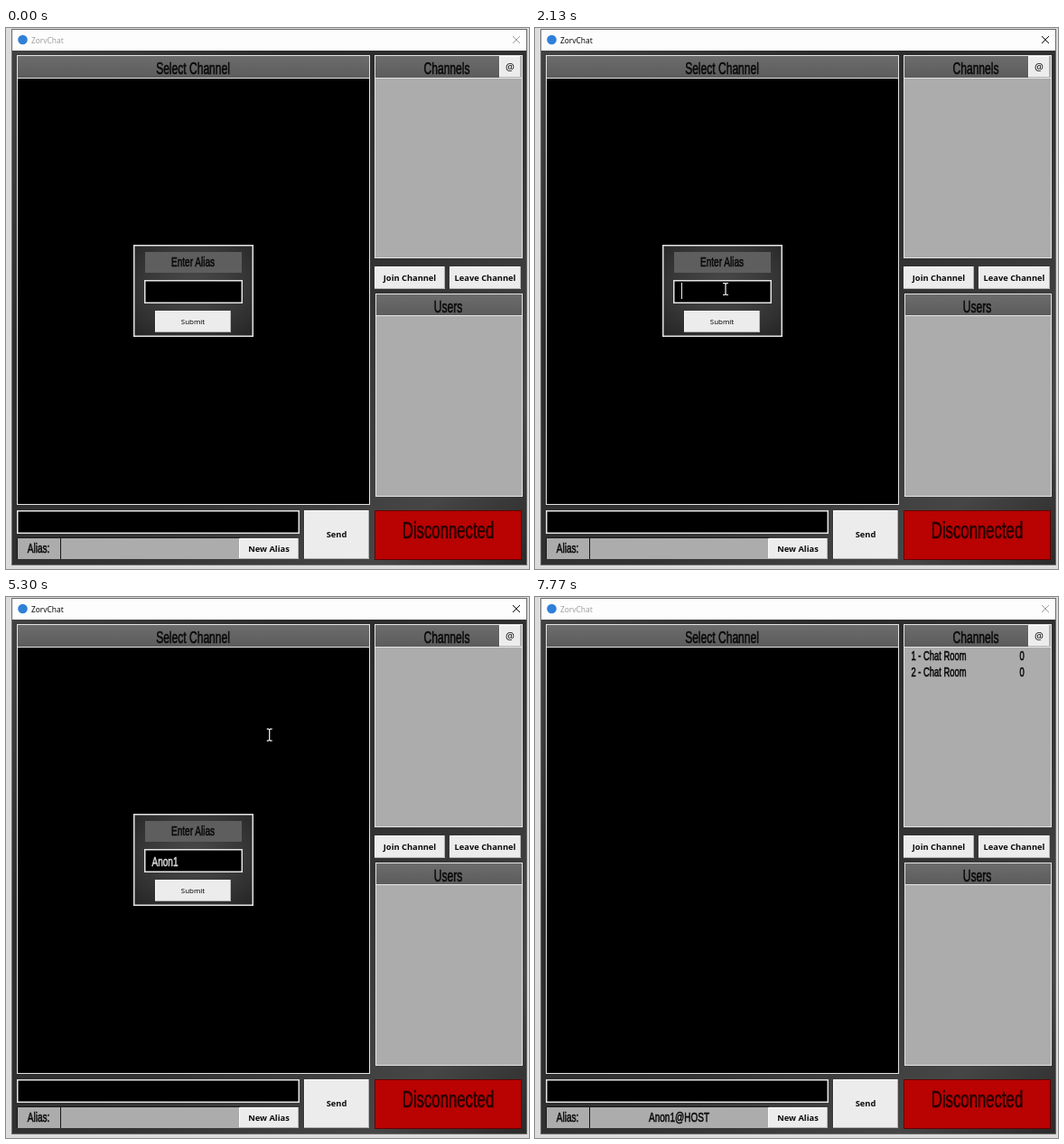
An HTML page that plays this animation: 579 by 599 pixels, repeating every 8000 ms.

```html
<!DOCTYPE html>
<html lang="en">
<head>
<meta charset="utf-8">
<title>ZorvChat</title>
<style>
html, body { margin: 0; width: 100%; height: 100%; overflow: hidden; background: #dcdcdc; }
svg { display: block; width: 100vw; height: 100vh; }
text { white-space: pre; }
.narrow { font-family: "Liberation Sans", Arial, sans-serif; }
.ui { font-family: "Noto Sans", "Open Sans", sans-serif; text-anchor: middle; }
</style>
</head>
<body>
<svg id="stage" viewBox="0 0 579 599">
  <defs>
    <linearGradient id="shade" x1="0" y1="0" x2="1" y2="1">
      <stop offset="0" stop-color="#444"/>
      <stop offset=".3" stop-color="#2b2b2b"/>
      <stop offset=".6" stop-color="#333"/>
      <stop offset=".85" stop-color="#464646"/>
      <stop offset="1" stop-color="#2a2a2a"/>
    </linearGradient>
    <radialGradient id="glow" cx=".5" cy=".45" r=".75">
      <stop offset="0" stop-color="#4a4a4a"/>
      <stop offset=".55" stop-color="#383838"/>
      <stop offset="1" stop-color="#242424"/>
    </radialGradient>
    <linearGradient id="head" x1="0" y1="0" x2="0" y2="1">
      <stop offset="0" stop-color="#6c6c6c"/>
      <stop offset="1" stop-color="#5c5c5c"/>
    </linearGradient>
  </defs>
</svg>
<script>
const LOOP = 8000;
const NARROW = 0.67;
const PALE = '#ececec', EDGE = '#e4e4e4', GREY = '#acacac', INK = '#0a0a0a';
const ALIAS = 'Anon1';
const KEYS = [2800, 2970, 3130, 3330, 3500];

const stage = document.getElementById('stage');

function add(parent, tag, attrs, content) {
  const node = document.createElementNS('http://www.w3.org/2000/svg', tag);
  for (const key in attrs) node.setAttribute(key, attrs[key]);
  if (content !== undefined) node.textContent = content;
  parent.appendChild(node);
  return node;
}
const group = (parent = stage) => add(parent, 'g', {});
const path = (parent, d, stroke, width = 1) =>
  add(parent, 'path', { d, stroke, 'stroke-width': width, fill: 'none' });

function box(parent, x, y, w, h, fill, stroke, width = 1) {
  const attrs = { x, y, width: w, height: h, fill };
  if (stroke) {
    Object.assign(attrs, { x: x + width / 2, y: y + width / 2, width: w - width, height: h - width,
      stroke, 'stroke-width': width });
  }
  return add(parent, 'rect', attrs);
}

function narrow(parent, str, x, y, size, anchor = 'middle', fill = INK) {
  return add(parent, 'text', { class: 'narrow', 'font-size': size, 'text-anchor': anchor, fill,
    stroke: fill, 'stroke-width': 0.6, transform: `translate(${x} ${y}) scale(${NARROW} 1)` }, str);
}

function label(parent, str, x, y, size, weight = 400, fill = INK) {
  return add(parent, 'text', { class: 'ui', x, y, 'font-size': size, 'font-weight': weight, fill }, str);
}

function button(parent, str, x, y, w, h, size = 9.3, weight = 700) {
  const g = group(parent);
  box(g, x, y, w, h, PALE);
  path(g, `M${x + 0.5} ${y + h}V${y + 0.5}H${x + w}`, '#fafafa');
  path(g, `M${x + w - 0.5} ${y}V${y + h - 0.5}H${x}`, '#b4b4b4');
  label(g, str, x + w / 2, y + h / 2 + size * 0.37, size, weight);
  return g;
}

// window frame
box(stage, 0, 0, 579, 599, '#dcdcdc');
box(stage, 6, 1, 571, 594, 'url(#shade)', '#6a6a6a');
box(stage, 7, 2, 569, 23, '#fdfdfd');
add(stage, 'circle', { cx: 18.5, cy: 13, r: 5.3, fill: '#2f80d8' });
const title = label(stage, 'ZorvChat', 28, 16.5, 8.4);
title.style.textAnchor = 'start';
const cross = path(stage, 'M561 9l8 8M569 9l-8 8', INK);

// message area
box(stage, 12, 30, 391, 498, '#000', EDGE);
box(stage, 13, 31, 389, 24, 'url(#head)');
path(stage, 'M12 55.5H403', EDGE);
narrow(stage, 'Select Channel', 207, 51, 18);

// channel list
box(stage, 408, 30, 164, 225, GREY, EDGE);
box(stage, 409, 31, 137, 24, 'url(#head)');
path(stage, 'M408 55.5H572', EDGE);
narrow(stage, 'Channels', 488, 51, 18);
button(stage, '@', 546, 31, 24, 24, 11, 500);
button(stage, 'Join Channel', 408, 264, 78, 25);
button(stage, 'Leave Channel', 491, 264, 79, 25);

// user list
box(stage, 409, 294, 163, 225, GREY, EDGE);
box(stage, 410, 295, 161, 23, 'url(#head)');
path(stage, 'M409 318.5H572', EDGE);
narrow(stage, 'Users', 489.5, 315, 18);

// bottom bar
box(stage, 12, 534, 313, 26, '#000', EDGE, 1.5);
box(stage, 13, 565, 246, 23, GREY);
path(stage, 'M13 564.5H259M12.5 565V588M60.5 565V588', '#181818');
narrow(stage, 'Alias:', 36, 581, 15);
button(stage, 'New Alias', 258, 565, 66, 23);
button(stage, 'Send', 330, 534, 72, 54);
box(stage, 408, 534, 163, 55, '#b90202', '#640000');
narrow(stage, 'Disconnected', 489.5, 565, 25, 'middle', '#260000');

const aliasValue = narrow(stage, ALIAS + '@HOST', 159.5, 581, 15);

const rooms = group();
[1, 2].forEach((n, i) => {
  narrow(rooms, `${n} - Chat Room`, 416.5, 70 + 18 * i, 14, 'start');
  narrow(rooms, '0', 539, 70 + 18 * i, 14);
});

// alias dialog
const dialog = group();
box(dialog, 141, 240, 133, 102, 'url(#glow)', EDGE, 1.5);
box(dialog, 154, 248, 107, 23, '#5e5e5e');
narrow(dialog, 'Enter Alias', 207, 264, 15);
box(dialog, 153, 279, 109, 26, '#000', EDGE, 1.5);
const typed = narrow(dialog, '', 161.5, 298, 15, 'start', '#dcdcdc');
const caret = box(dialog, 162, 282, 1, 18, PALE);
const submit = button(dialog, 'Submit', 165, 313, 84, 24, 7.9, 400);
const focus = add(submit, 'rect', { x: 167.5, y: 315.5, width: 79, height: 19, fill: 'none',
  stroke: '#6e6e6e', 'stroke-dasharray': '1 1' });

// mouse pointers
const beam = path(stage, 'M-3 -6.5H-1L0 -5.5L1 -6.5H3M0 -5.5V5.5M-3 6.5H-1L0 5.5L1 6.5H3', '#f6f6f6', 1.2);
const arrow = add(stage, 'path', { d: 'M0 0V14L3.2 11L5.6 16.5L8 15.5L5.6 10.2H10Z',
  fill: '#fff', stroke: '#111', 'stroke-width': 0.8 });

// each trip: points of [time, x, y]
const TRIPS = [
  [[200, 585, 604], [700, 410, 500], [1100, 215, 425], [1430, 162, 370], [1500, 162, 370],
    [1770, 211, 289], [2800, 211, 289]],
  [[4930, 211, 289], [5130, 250, 190], [5270, 285, 150], [5410, 306, 190], [5580, 265, 290],
    [5730, 221, 329], [6300, 221, 329], [6550, 285, 345], [6770, 378, 328], [6950, 475, 280],
    [7100, 590, 228]]
];

const inside = (x, y, l, t, r, b) => x >= l && x <= r && y >= t && y <= b;

function pointer(t) {
  const trip = TRIPS.find(p => t >= p[0][0] && t < p[p.length - 1][0]);
  if (!trip) return null;
  const i = trip.findIndex(p => p[0] > t) - 1;
  const at = n => trip[Math.max(0, Math.min(trip.length - 1, n))];
  const a = at(i), b = at(i + 1), u = (t - a[0]) / (b[0] - a[0]);
  if (a[1] === b[1] && a[2] === b[2]) return [a[1], a[2]];
  // Hermite curve; velocity is zero next to a rest
  const slope = (n, k) => {
    const p = at(n - 1), q = at(n), r = at(n + 1);
    const still = (c, d) => c[1] === d[1] && c[2] === d[2];
    return still(p, q) || still(q, r) ? 0 : (r[k] - p[k]) / (r[0] - p[0]) * (b[0] - a[0]);
  };
  return [1, 2].map(k => {
    const u2 = u * u, u3 = u2 * u;
    return a[k] * (2 * u3 - 3 * u2 + 1) + b[k] * (3 * u2 - 2 * u3)
      + slope(i, k) * (u3 - 2 * u2 + u) + slope(i + 1, k) * (u3 - u2);
  });
}

const show = (node, on) => node.setAttribute('visibility', on ? 'inherit' : 'hidden');
const clamp = v => Math.max(0, Math.min(1, v));

function caretOn(t) {
  return (t >= 1930 && t < 2630) || (t >= 2800 && t < 4000) || (t >= 4570 && t < 5100);
}

function draw(t) {
  const active = clamp((t - 1900) / 200) - clamp((t - 7470) / 270);
  const level = Math.round(160 - 148 * active);
  const tone = `rgb(${level},${level},${level})`;
  title.setAttribute('fill', tone);
  cross.setAttribute('stroke', tone);

  const open = t < 6000;
  show(dialog, open);
  show(aliasValue, !open);
  show(rooms, t >= 6100);

  typed.textContent = ALIAS.slice(0, KEYS.filter(k => t >= k).length);
  show(caret, caretOn(t));
  caret.setAttribute('x', typed.textContent ? 162 + typed.getComputedTextLength() * NARROW : 162);

  const pressed = t >= 5770;
  submit.setAttribute('transform', pressed ? 'translate(1 1)' : '');
  show(focus, pressed);

  // hidden children must not outlive a hidden dialog
  dialog.setAttribute('display', open ? 'inline' : 'none');

  const pos = pointer(t);
  show(beam, false);
  show(arrow, false);
  if (pos) {
    const [x, y] = pos;
    const overField = inside(x, y, 154, 280, 261, 304);
    const overDialog = open && inside(x, y, 141, 240, 274, 342);
    const text = overField || (inside(x, y, 13, 56, 402, 527) && !overDialog);
    const node = text ? beam : arrow;
    node.setAttribute('transform', `translate(${x.toFixed(1)} ${y.toFixed(1)})`);
    show(node, true);
  }
}

const start = performance.now();
function tick(now) {
  draw(Math.max(0, now - start) % LOOP);
  requestAnimationFrame(tick);
}
draw(0);
requestAnimationFrame(tick);
</script>
</body>
</html>
```
